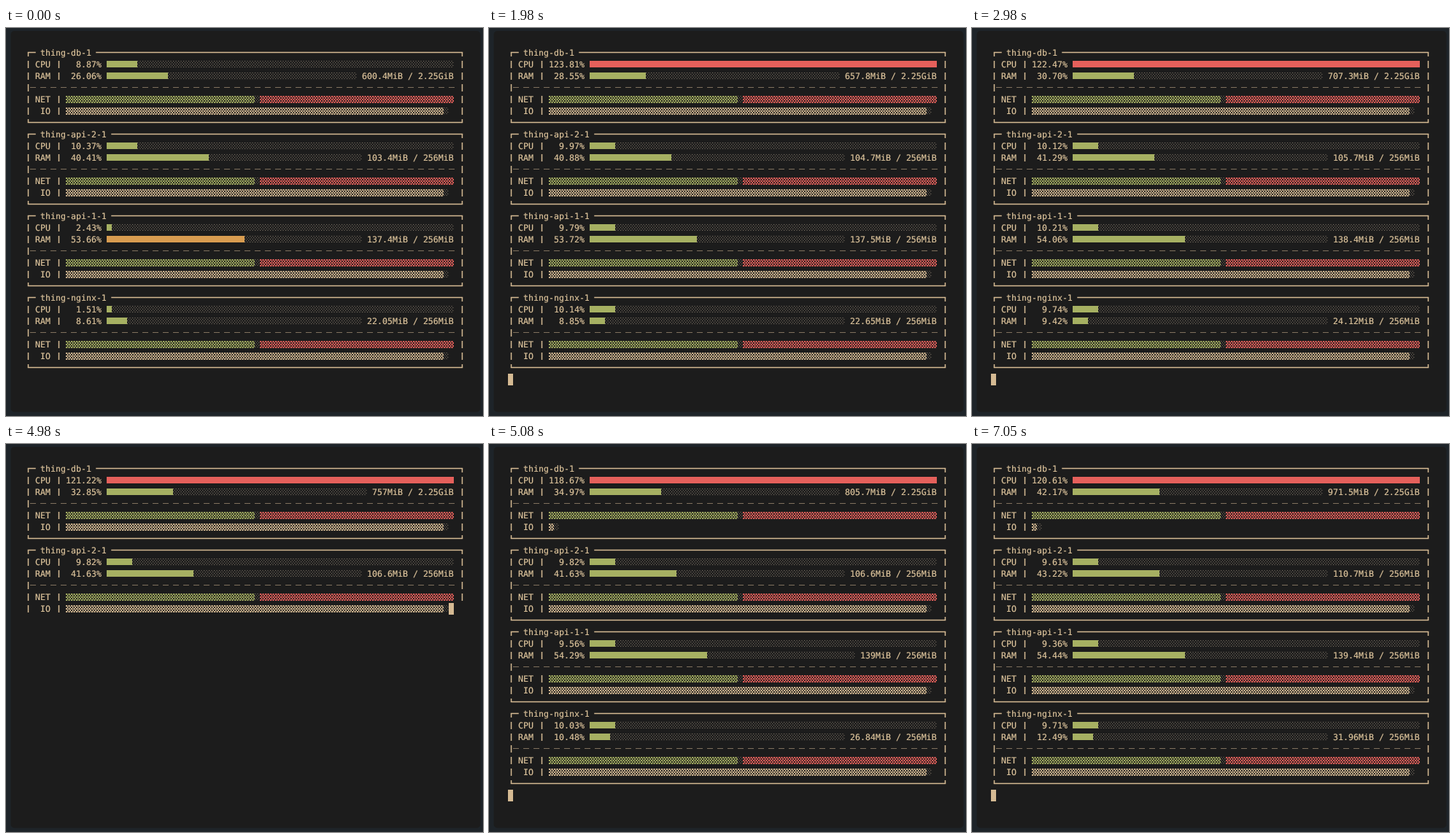
Animation of 654 by 532 pixels, one loop 8000 ms. Source, as an HTML page:

```html
<!DOCTYPE html>
<html lang="en">
<head>
<meta charset="utf-8">
<title>Container stats</title>
<style>
html, body { margin: 0; width: 100%; height: 100%; overflow: hidden; background: #1e2429; }
svg { display: block; }
text { font: 11.627px "DejaVu Sans Mono", "Liberation Mono", monospace; fill: #dcc39b; stroke: #dcc39b; stroke-width: .2; text-rendering: geometricPrecision; }
</style>
</head>
<body>
<svg id="stage" width="654" height="532" viewBox="0 0 654 532">
  <defs id="defs"></defs>
  <rect x="6.5" y="4" width="644" height="522.5" rx="5" fill="#1c1c1c"/>
</svg>
<script>
const LOOP = 8000;
const CELL = 7, ROW = 16, LEFT = 26, TOP = 26;
const BAR = 16, END = 84, EDGE = 85;
const LINE = 1.5;
const FG = '#d5ba93', GREEN = '#a6b062', RED = '#e5605b', ORANGE = '#d89c50';

const names = ['thing-db-1', 'thing-api-2-1', 'thing-api-1-1', 'thing-nginx-1'];
const limits = ['2.25GiB', '256MiB', '256MiB', '256MiB'];

// One container per group: cpu %, ram %, used MiB; "=n" fixes the filled cells.
const steps = [
  { at: 0, cursor: null, data: '8.87 26.06 600.4|10.37=6 40.41 103.4|2.43 53.66=27 137.4|1.51 8.61 22.05' },
  { at: 480, data: '117.94 26.72 615.6|9.91 40.66 104.1|9.64 53.71 137.5|9.83 8.73 22.35' },
  { at: 1980, data: '123.81 28.55 657.8|9.97 40.88 104.7|9.79 53.72 137.5|10.14 8.85 22.65' },
  { at: 2980, data: '122.47 30.70 707.3|10.12 41.29 105.7|10.21 54.06 138.4|9.74 9.42 24.12' },
  { at: 3980, data: '121.22 32.85 757|10.00 41.70 106.8|10.59=6 54.33 139.1|9.37 9.99 25.59' },
  { at: 4980, cursor: [83, 12], cut: true, data: '121.22 32.85 757|9.82 41.63 106.6' },
  { at: 5080, lowIo: true, data: '118.67 34.97 805.7|9.82 41.63 106.6|9.56 54.29 139|10.03 10.48 26.84' },
  { at: 6060, lowIo: true, data: '119.52 38.57 888.7|9.72 42.42 108.6|9.47 54.38 139.2|9.87 11.48 29.39' },
  { at: 7050, lowIo: true, data: '120.61 42.17 971.5|9.61 43.22 110.7|9.36 54.44 139.4|9.71 12.49=4 31.96' }
];

const px = col => LEFT + col * CELL;
const py = row => TOP + row * ROW;
const midX = col => px(col) + 4.5;
const midY = row => py(row) + 7.5;
const rect = (x, y, w, h, fill) =>
  `<rect x="${x}" y="${y}" width="${w}" height="${h}" fill="${fill}"/>`;
const hline = (x1, x2, y) => rect(x1 - LINE / 2, y - LINE / 2, x2 - x1 + LINE, LINE, FG);
const vline = (x, y1, y2) => rect(x - LINE / 2, y1, LINE, y2 - y1, FG);
const label = (col, row, str) => `<text x="${px(col)}" y="${py(row) + 12}">${str}</text>`;
const post = (col, row) => vline(midX(col), py(row) + 3, py(row) + 13);
const shade = (col, row, n, id) => rect(px(col), py(row) + 3, n * CELL, 10, `url(#${id})`);

// Staggered dots, two columns per cell, in step with the rows.
function dots(id, color, w, h) {
  return `<pattern id="${id}" x="${LEFT}" y="${TOP + 3}" width="3.5" height="4" patternUnits="userSpaceOnUse">` +
    rect(0, 0, w, h, color) + rect(1.75, 2, w, h, color) + '</pattern>';
}

function bar(row, value, width, scale) {
  const [pct, fixed] = value.split('=');
  const n = Math.min(width, fixed ? +fixed : Math.floor(pct * width / scale));
  const color = n / width > 0.8 ? RED : n / width > 0.5 ? ORANGE : GREEN;
  return label(8, row, (pct + '%').padStart(7, '\u00a0')) +
    shade(BAR + n, row, width - n, 'light') +
    rect(px(BAR), py(row) + 3, n * CELL, 9, color);
}

function panel(i, [cpu, ram, used], scale, ioCells, cut) {
  const r = i * 7, left = midX(0), right = midX(EDGE);
  const usage = `${used}MiB / ${limits[i]}`;
  const usageCol = END - usage.length;
  let out = hline(left, px(2), midY(r)) + label(3, r, names[i]) +
    hline(px(names[i].length + 4), right, midY(r)) +
    vline(left, midY(r), py(r) + 13) + vline(right, midY(r), py(r) + 13);

  ['CPU', 'RAM', '', 'NET', '\u00a0IO'].forEach((title, k) => {
    const row = r + k + 1;
    out += post(0, row);
    if (!(cut && k === 4)) out += post(EDGE, row);
    if (title) out += label(2, row, title) + post(6, row);
  });

  out += bar(r + 1, cpu, END - BAR, scale) +
    bar(r + 2, ram, usageCol - 1 - BAR, scale) + label(usageCol, r + 2, usage);
  for (let c = 1; c < END; c += 2) out += rect(px(c), py(r + 3) + 7, 8, 1, '#80715d');
  out += shade(8, r + 4, 37, 'green') + shade(45, r + 4, 1, 'light') + shade(46, r + 4, 38, 'red') +
    shade(8, r + 5, ioCells, 'sand') + shade(8 + ioCells, r + 5, 1, 'light');

  if (!cut) {
    const y = midY(r + 6);
    out += hline(left, right, y) + vline(left, y - 4.5, y) + vline(right, y - 4.5, y);
  }
  return out;
}

function screen({ data, cut, lowIo, cursor = [0, 28] }) {
  const rows = data.split('|').map(s => s.split(' '));
  const scale = Math.max(100, ...rows.map(v => parseFloat(v[0])));
  let out = rows.map((v, i) =>
    panel(i, v, scale, lowIo && i === 0 ? 1 : 74, cut && i === rows.length - 1)).join('');
  if (cursor) out += rect(px(cursor[0]), py(cursor[1]), CELL, ROW, FG);
  return out;
}

document.getElementById('defs').innerHTML =
  dots('light', '#85796a', 1.1, 1) + dots('green', GREEN, 2.2, 2) +
  dots('red', RED, 2.2, 2) + dots('sand', FG, 2.2, 2);

const stage = document.getElementById('stage');
const layers = steps.map(step => {
  const g = document.createElementNS('http://www.w3.org/2000/svg', 'g');
  g.innerHTML = screen(step);
  g.style.display = 'none';
  return stage.appendChild(g);
});

let shown = -1;
const start = performance.now();
function draw(now) {
  const t = Math.max(0, now - start) % LOOP;
  const next = steps.findLastIndex(s => s.at <= t);
  if (next !== shown) {
    layers.forEach((g, i) => { g.style.display = i === next ? '' : 'none'; });
    shown = next;
  }
  requestAnimationFrame(draw);
}
draw(start);
</script>
</body>
</html>
```
